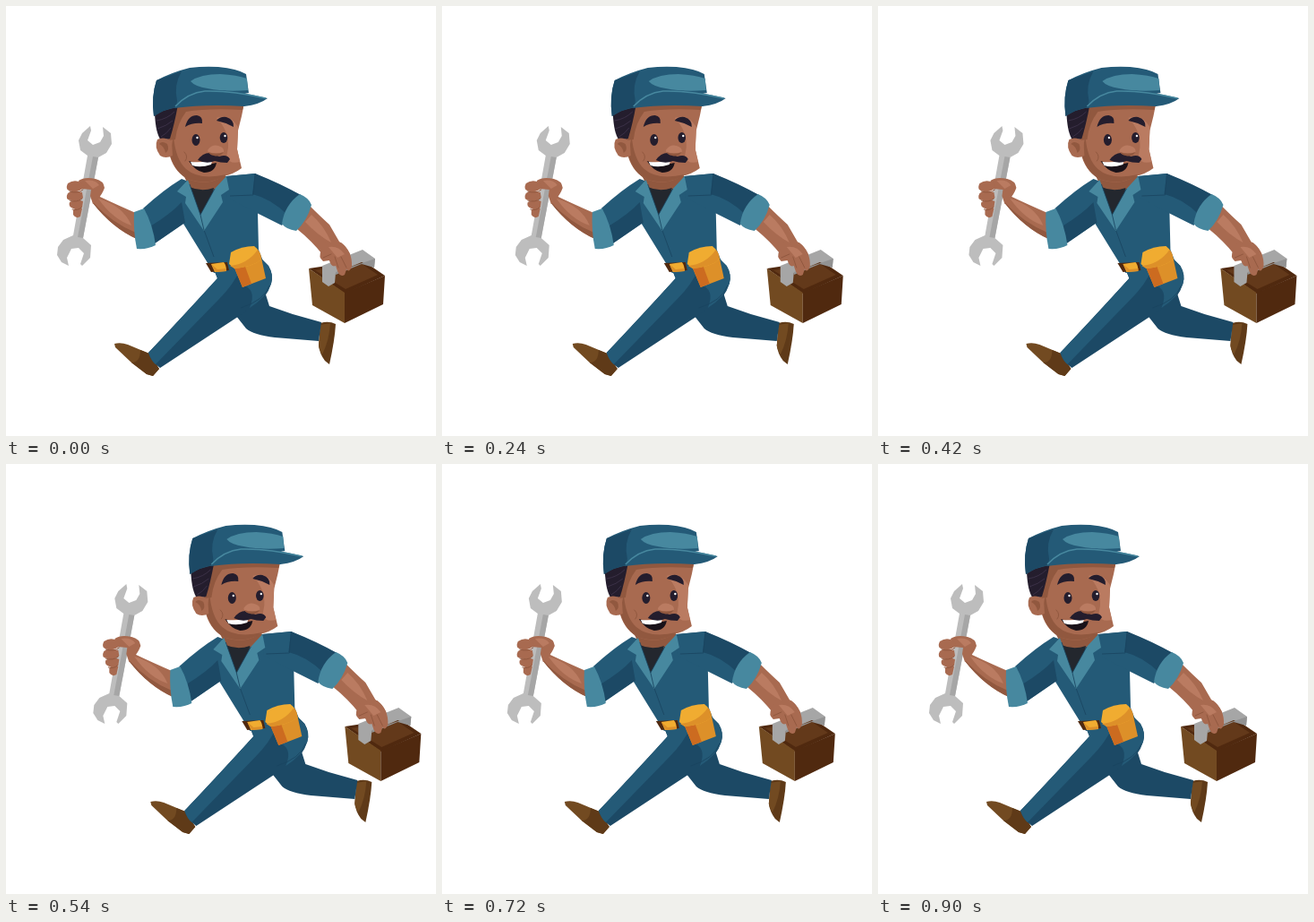
Write an HTML page without scripts that moves like this. It is 480 px wide and 480 px high and loops after 930 ms.

```html
<!DOCTYPE html>
<html lang="en">
<head>
<meta charset="utf-8">
<title>Running repairman</title>
<style>
@property --tick { syntax: "<number>"; inherits: true; initial-value: 0; }
html, body { margin: 0; width: 100%; height: 100%; overflow: hidden; background: #fff; }
svg { display: block; width: 100vw; height: 100vh; }

/* 31 ticks of 30 ms: out for 15, back for 15, smoothstep both ways */
#runner {
  --t: calc(min(var(--tick), 30 - var(--tick)) / 15);
  transform: translateX(calc(45px * var(--t) * var(--t) * (3 - 2 * var(--t))));
  animation: run 930ms steps(31) infinite;
}
@keyframes run { from { --tick: 0; } to { --tick: 31; } }

.blue { fill: #245a77; }
.navy { fill: #1c4965; }
.teal { fill: #47889f; }
.skin { fill: #a86a50; }
.tan { fill: #ba7b61; }
.shade { fill: #91583f; }
.ink { fill: #241d2d; }
.tee { fill: #23272e; }
.boot { fill: #724a21; }
.heel { fill: #5f3a18; }
.bark { fill: #50290f; }
.steel { fill: #bdbdbd; }
.iron { fill: #a6a6a6; }
.gold { fill: #f0ac31; }
.amber { fill: #dd9029; }
.rust { fill: #cc6b20; }
.white { fill: #fff; }
.line { fill: none; stroke: #1a4560; stroke-width: .8; }
.crease { fill: none; stroke: #91583f; stroke-width: 1; stroke-linecap: round; }
</style>
</head>
<body>
<svg viewBox="0 0 480 480">
<g id="runner">

  <g id="back-leg">
    <path class="heel" d="M351 354Q360 351 368 355Q367 373 361 400L356 396Q350 388 349 379Z"/>
    <path class="boot" d="M351 356L362 354Q361 373 353 389Q349 382 349 379Z"/>
    <path class="navy" d="M257 346L289 319L294 335L320 344L352 353L349 374L300 370Q276 367 268 360Z"/>
  </g>

  <g id="front-leg">
    <path class="boot" d="M121 377Q128 375 136 378L160 388L171 405L164 413L157 411L140 398L122 381Z"/>
    <path class="heel" d="M150 384L160 388L171 405L164 413L157 411L140 398Q150 398 150 384Z"/>
    <path class="navy" d="M236 304L232 294L283 280L293 290Q299 300 296 310Q291 326 277 335L172 404Q162 397 159 387Q196 348 236 304Z"/>
    <path class="blue" d="M236 304L232 294L262 293Q254 311 238 327L167 400Q162 396 159 387Q196 348 236 304Z"/>
    <path class="blue" d="M262 285L283 280L293 290Q299 300 296 310Q291 325 272 337Q281 316 262 310Z"/>
    <path class="line" d="M262 337Q288 329 294 312"/>
  </g>

  <g id="torso">
    <path class="blue" d="M203 195L246 190L278 187L281 231L282 272L289 290L232 298L214 269L198 243L190 208Z"/>
    <path class="line" d="M221 250L232 280"/>
  </g>

  <g id="left-arm">
    <path class="skin" d="M101 208L105 213Q124 222 147 232L146 260Q119 248 97 220Z"/>
    <path class="tan" d="M103 215Q131 223 140 245Q119 238 103 215Z"/>
    <path class="shade" d="M98 220Q118 242 145 253L146 260Q119 248 97 220Z"/>
    <path class="blue" d="M153 226Q176 205 196 193L204 196L211 231L198 243L166 265Z"/>
    <path class="navy" d="M161 246Q184 232 196 219L200 242L198 243L166 265Z"/>
    <path class="teal" d="M143 230L154 226Q164 244 167 267Q158 272 146 271Q142 252 143 230Z"/>
  </g>

  <g id="right-arm">
    <path class="skin" d="M325 249L339 223Q351 235 361 244L372 263Q388 274 385 291L378 300L353 277Q341 262 325 249Z"/>
    <path class="tan" d="M341 233Q355 245 363 264Q348 256 334 241Z"/>
    <path class="blue" d="M246 190L278 187L329 211L308 245L280 231L247 214Z"/>
    <path class="navy" d="M278 187Q306 198 329 211L314 233Q296 215 275 210Z"/>
    <path class="line" d="M278 187L276 211L250 212"/>
    <path class="teal" d="M328 210Q338 214 341 222Q336 240 324 251Q312 249 308 243Q311 222 328 210Z"/>
  </g>

  <g id="neck">
    <path class="shade" d="M195 183L246 184L244 198L227 208L207 206Z"/>
    <path class="tee" d="M205 202Q218 208 232 203L229 218L217 234L207 218Z"/>
    <path class="teal" d="M203 194L191 207L201 213L200 220L221 251L217 233Z"/>
    <path class="teal" d="M246 190L249 205L240 211L242 219L221 251L217 233L233 204Z"/>
    <path class="line" d="M205 199L217 233L221 250M217 233L233 204"/>
  </g>

  <g id="head">
    <path class="skin" d="M180 108H266L263 123L259 139L258 160L263 181Q254 188 242 190Q226 201 205 194Q189 187 183 168L180 150Z"/>
    <path class="shade" d="M187 145Q189 171 201 182Q216 195 246 188Q228 201 205 194Q189 187 183 166Z"/>
    <path class="shade" d="M180 108H266L264 116Q225 114 201 118Q191 131 189 149L181 150Z"/>
    <path class="tan" d="M235 125Q250 120 259 135L258 160L261 174Q250 177 246 169L248 158Q249 139 235 125Z"/>
    <path class="ink" d="M166 120L192 110Q188 132 183 148L173 150Q167 142 166 120Z"/>
    <path d="M168 128Q180 126 188 118M169 137Q179 134 186 128M173 146Q180 142 184 136" fill="none" stroke="#41354d" stroke-width=".8"/>
    <path class="skin" d="M185 151Q176 145 169 149Q165 157 172 167Q178 171 186 167Z"/>
    <path class="shade" d="M180 154Q174 150 171 154Q177 157 178 164Q183 161 180 154Z"/>
    <path class="ink" d="M200 135Q203 122 213 122Q220 123 219 131Q208 130 200 135ZM235 128Q239 123 246 124Q255 127 254 135Q245 130 235 128Z"/>
    <ellipse class="ink" cx="212" cy="149.500" rx="4.500" ry="6.500"/>
    <ellipse class="ink" cx="243" cy="147" rx="4.300" ry="6"/>
    <circle class="white" cx="213.500" cy="147" r="1.200"/>
    <circle class="white" cx="244.500" cy="145" r="1.200"/>
    <path class="crease" d="M199 163Q204 168 200 173"/>
    <path d="M204 173Q220 179 235 175Q233 186 221 186Q211 184 204 173Z" fill="#191219"/>
    <path class="white" d="M206 174Q216 175 230 173L229 177Q217 181 208 178Z"/>
    <path class="ink" d="M214 172Q220 163 229 164L238 168Q247 165 250 171L247 175Q239 175 233 173Q224 177 214 172Z"/>
    <path class="tan" d="M225 161Q230 154 237 156Q244 158 243 163Q238 169 232 166Q226 166 225 161Z"/>
    <path class="shade" d="M226 163Q234 166 243 163Q239 169 232 167Q227 166 226 163Z"/>
  </g>

  <g id="cap">
    <path class="blue" d="M165 123Q162 101 168 83Q185 74 205 69Q221 67 237 68Q258 70 268 76L271 97L192 113Q177 115 165 123Z"/>
    <path class="navy" d="M165 123Q162 101 168 83L196 73Q187 88 191 106L190 113Q177 115 165 123Z"/>
    <path class="teal" d="M206 84Q217 76 239 76Q258 77 269 81L270 94Q244 96 225 92Q211 90 206 84Z"/>
    <path class="blue" d="M188 114Q202 96 222 94Q253 93 292 103Q283 110 266 112Q224 109 188 114Z"/>
    <path d="M189 112Q203 97 222 95Q251 94 290 103" fill="none" stroke="#47889f" stroke-width="1.500"/>
  </g>

  <g id="belt">
    <path class="bark" d="M223 287L247 286L249 295L229 297Z"/>
    <path class="gold" d="M229 288L243 286Q246 289 246 296L233 297Z"/>
    <path class="amber" d="M229 288L234 297L246 296V293L236 294Z"/>
    <path class="amber" d="M254 290L285 281L290 304L264 314Z"/>
    <path class="rust" d="M254 290L267 291L274 310L264 314Z"/>
    <path class="gold" d="M251 275Q263 268 277 268Q284 273 285 283Q275 291 255 293L249 288Z"/>
    <path class="amber" d="M281 272Q285 276 285 283Q275 291 255 293L250 290Q270 288 281 272Z"/>
  </g>

  <g id="toolbox">
    <path class="bark" d="M338 293L398 284L423 301L378 321Z"/>
    <path d="M345 295L396 287L415 300L379 316Z" fill="#63391a"/>
    <path class="boot" d="M338 293L378 320V354L342 334Z"/>
    <path class="bark" d="M378 320L423 301L421 333L378 354Z"/>
    <path class="iron" d="M353 290L398 272L412 282L411 292L397 286L368 298L367 309L360 313L353 308Z"/>
    <path d="M368 297L412 282L411 292L397 288L368 300Z" fill="#929292"/>
  </g>

  <g id="right-hand">
    <path class="skin" d="M357 264L374 264Q387 274 386 291Q383 298 380 294L378 300Q373 303 370 296L368 290Q363 292 361 284L354 285Q348 280 352 273Z"/>
    <path class="tan" d="M360 269Q371 267 378 277L370 281Z"/>
    <path class="crease" d="M367 280L371 292M374 280L380 292M354 281L363 277"/>
  </g>

  <g id="wrench">
    <path class="steel" d="M81 150L85 142L94 134L95 139L91 150L97 155L105 152L109 145L108 135L117 142L118 154L112 164L103 169L86 259L95 267L94 281L85 290L83 288L87 276L81 270L73 271L68 281L70 290L62 286L57 278L58 269L64 261L75 256L91 167L83 161Z"/>
    <path class="iron" d="M97 168L103 169L86 259L80 258Z"/>
  </g>

  <g id="left-hand">
    <path class="skin" d="M81 195Q88 190 100 193Q109 195 110 203Q107 211 102 216L97 221L94 212L95 205L84 204Z"/>
    <path class="tan" d="M88 195Q99 193 104 200L97 204Z"/>
    <path class="skin" d="M69 198Q76 193 84 197L87 202Q83 208 74 207Q65 206 69 198Z"/>
    <path class="skin" d="M69 209Q75 204 85 208L86 214Q81 219 73 217Q65 216 69 209Z"/>
    <path class="skin" d="M71 219Q78 214 86 218L85 225Q80 229 75 226Q69 224 71 219Z"/>
    <path class="skin" d="M75 228Q80 224 85 226L83 235Q78 238 75 233Z"/>
    <path class="crease" d="M71 207Q80 210 86 205M71 217Q79 220 85 215M74 227Q80 229 84 225"/>
  </g>

</g>
</svg>
</body>
</html>
```
